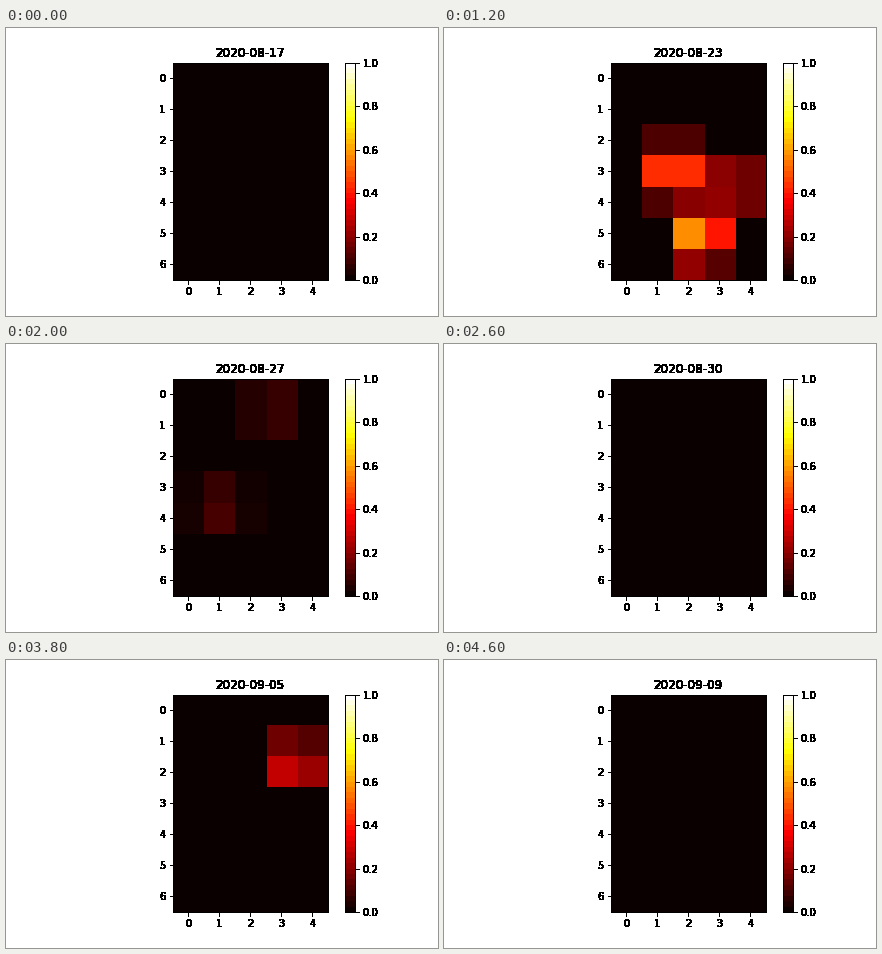
Write a matplotlib script that moves like this. It is 432 px wide and 288 px high and loops after 5.6 s.

```python
import numpy as np
import matplotlib.pyplot as plt
from matplotlib.animation import FuncAnimation
from matplotlib.cm import ScalarMappable

ROWS, COLS = 7, 5
LAST_DAY = 23
FRAMES = 28
RADIUS = 1.3

# Hot spots: day of greatest heat, row, column, peak
SPOTS = [
    (2, .5, 1.4, .3),
    (4, 2.4, 2.4, 1.1),
    (6, 3, 1.5, .7),
    (6, 3.5, 3.4, .38),
    (6, 5.1, 2.35, .8),
    (8, 4.8, 1, .25),
    (10, 3.6, 1, .13),
    (11, .5, 2.7, .25),
    (16, 3.5, 1, .25),
    (19, 1.75, 3.4, .43),
    (21, 2.2, 3.5, .12),
]
Y, X = np.mgrid[:ROWS, :COLS]


def heat(day):
    """Sum of cones that swell and fade within two days of their peak."""
    total = np.zeros((ROWS, COLS))
    for peak_day, row, col, peak in SPOTS:
        strength = peak * max(0, 1 - abs(day - peak_day) / 2)
        dist = np.hypot(Y - row, X - col)
        total += strength * np.clip(1 - dist / RADIUS, 0, 1)
    return total


def date_label(day):
    month, date = (8, 17 + day) if day < 15 else (9, day - 14)
    return f"2020-{month:02d}-{date:02d}"


def solid(rgba, dpi):
    """Make every touched pixel opaque, so text and lines have hard edges."""
    hard = np.array(rgba, dtype=float)
    hard[..., 3] = hard[..., 3] > 0
    return hard, 0, 0


fig, ax = plt.subplots(figsize=(6, 4), dpi=72, facecolor="white")
fig.subplots_adjust(left=.125, right=.9, bottom=.125, top=.88)
image = ax.imshow(heat(0), cmap="hot", vmin=0, vmax=1, interpolation="nearest")
ax.set_xticks(range(COLS))
ax.set_yticks(range(ROWS))
title = ax.set_title(date_label(0))
bar = fig.colorbar(ScalarMappable(cmap=plt.get_cmap("hot", 40)), ax=ax,
                   ticks=np.linspace(0, 1, 6))

for part in (title, ax.xaxis, ax.yaxis, bar.ax.yaxis, bar.outline,
             *ax.spines.values()):
    part.set_agg_filter(solid)


def update(frame):
    day = min(frame, LAST_DAY)
    image.set_data(heat(day))
    title.set_text(date_label(day))
    return image, title


anim = FuncAnimation(fig, update, frames=FRAMES, interval=200,
                     repeat=True, repeat_delay=0)
plt.show()
```
